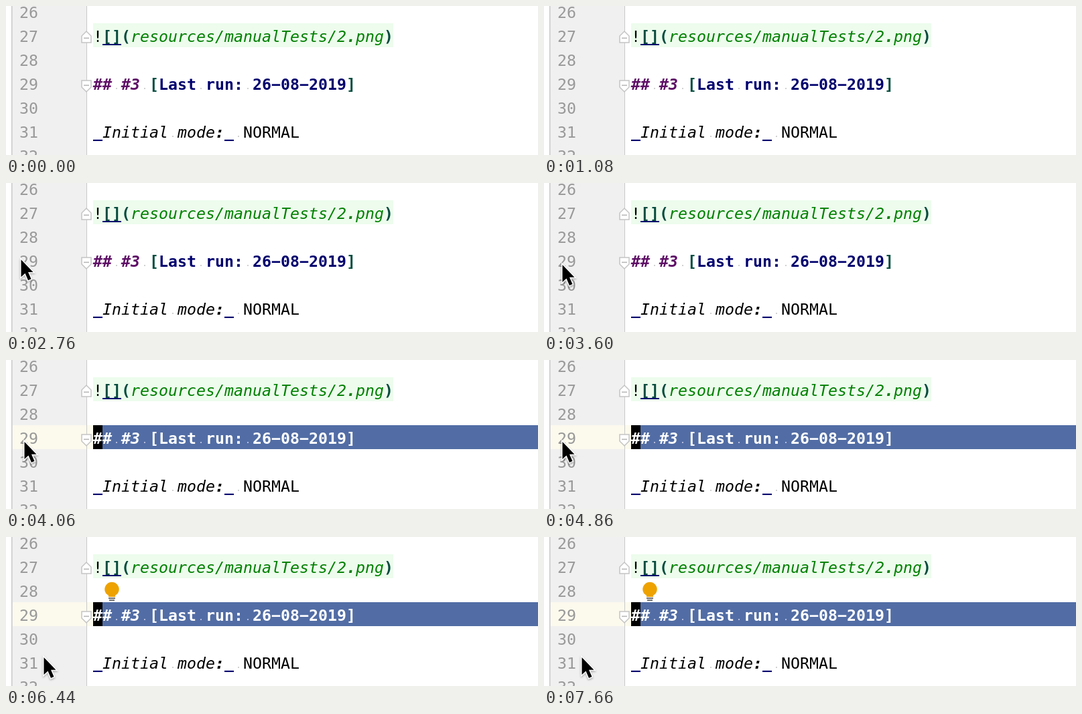
Recreate the animation shown at these times as an HTML page with a canvas. Size 794 px wide and 224 px high, loop 7.7 s.

```html
<!DOCTYPE html>
<html lang="en">
<head>
<meta charset="utf-8">
<title>Selecting a line from the gutter</title>
<style>
  html, body { margin: 0; width: 100%; height: 100%; overflow: hidden; background: #fff; }
  canvas { display: block; width: 794px; height: 224px; }
</style>
</head>
<body>
<canvas id="stage" width="794" height="224"></canvas>
<script>
const ctx = document.getElementById('stage').getContext('2d');
const LOOP = 7700, SELECT_AT = 3880, BULB_AT = 6400, ARROW_AT = 2700;
const CELL = 14, ROW = 36, LEFT = 130;
const FONT = '23.25px "DejaVu Sans Mono", "Liberation Mono", monospace';
const PAPER = '#ffffff', GUTTER = '#f0f0f0', EDGE = '#c9c9c9';
const LINK_ROW = '#edfced', CARET_ROW = '#fcfaed', SELECTION = '#526da5';
const GREEN = '#008000', TEAL = '#064b3e', NAVY = '#00006e', PURPLE = '#5e0e66', INK = '#000000';

// Each run: text, colour, font style
const LINES = {
  27: [['!', INK, ''], ['[]', TEAL, 'bold'], ['(', TEAL, 'bold'],
       ['resources/manualTests/2', GREEN, 'italic'], ['.', GREEN, 'italic bold'],
       ['png', GREEN, 'italic'], [')', TEAL, 'bold']],
  29: [['## #3', PURPLE, 'italic bold'], [' ', NAVY, 'bold'], ['[', TEAL, 'bold'],
       ['Last run: 26\u221208\u22122019', NAVY, 'bold'], [']', TEAL, 'bold']],
  31: [['_', NAVY, 'bold'], ['Initial mode', INK, 'italic'], [':', INK, 'italic bold'],
       ['_', NAVY, 'bold'], [' NORMAL', INK, '']]
};

// Pointer positions: time, x, y
const PATH = [
  [1860, -20, 94], [2060, 12.5, 99.5], [2460, 12.5, 99.5], [2950, 27.5, 123],
  [4880, 27.5, 123], [5420, 56.5, 181], [LOOP, 56.5, 181]
];

const baseline = n => 18 + (n - 26) * ROW;

function rect(x, y, w, h, color) {
  ctx.fillStyle = color;
  ctx.fillRect(x, y, w, h);
}

function shape(points, x = 0, y = 0) {
  ctx.beginPath();
  points.forEach(([px, py]) => ctx.lineTo(x + px, y + py));
  ctx.closePath();
}

function cells(text, x, y, color, style) {
  ctx.font = style + ' ' + FONT;
  [...text].forEach((ch, i) => {
    const cx = x + i * CELL;
    if (ch === ' ') {
      rect(cx + 6, y - 3, 2, 2, color === PAPER ? '#b4bbdc' : '#d0d0d0');
    } else {
      ctx.fillStyle = color;
      ctx.fillText(ch, cx, y);
    }
  });
}

function line(n, selected) {
  let x = LEFT;
  for (const [text, color, style] of LINES[n]) {
    cells(text, x, baseline(n), selected ? PAPER : color, style);
    x += text.length * CELL;
  }
}

function fold(y, dir) {
  shape([[0, -9 * dir], [7, -2 * dir], [7, 8 * dir], [-7, 8 * dir], [-7, -2 * dir]], 120, y);
  ctx.fillStyle = PAPER;
  ctx.fill();
  ctx.strokeStyle = '#c4c4c4';
  ctx.lineWidth = 1.5;
  ctx.stroke();
  rect(116, y + dir - 0.5, 8, 1.6, '#b8b8b8');
}

function bulb() {
  ctx.fillStyle = '#eda200';
  ctx.beginPath();
  ctx.arc(158, 78.5, 10.7, 0, Math.PI * 2);
  ctx.fill();
  rect(153, 86, 10, 4, '#eda200');
  rect(153, 91, 10, 2, '#6e6e6e');
  rect(154, 94, 8, 2, '#6e6e6e');
}

function outlined(points, x, y) {
  ctx.save();
  ctx.shadowColor = 'rgba(0,0,0,.3)';
  ctx.shadowBlur = 3;
  ctx.shadowOffsetY = 1.5;
  shape(points, x, y);
  ctx.lineJoin = 'miter';
  ctx.lineWidth = 3;
  ctx.strokeStyle = PAPER;
  ctx.stroke();
  ctx.restore();
  ctx.fillStyle = INK;
  ctx.fill();
}

const ARROW = [[0, 0], [0, 26], [6, 20.5], [10.5, 31], [15, 29], [10.5, 18.8], [18, 18.8]];
const QUARTER = [[2.2, -14.5], [2.2, -2], [7.5, -2], [7.5, -7], [14.5, 0]];
const mirror = (sx, sy) => QUARTER.map(([x, y]) => [x * sx, y * sy]);
const RESIZE = [...mirror(1, 1), ...mirror(1, -1).reverse(),
                ...mirror(-1, -1), ...mirror(-1, 1).reverse()];

function pointer(t) {
  if (t < PATH[0][0]) return;
  const i = PATH.findIndex(p => p[0] > t);
  const [t0, x0, y0] = PATH[i - 1], [t1, x1, y1] = PATH[i];
  const u = (t - t0) / (t1 - t0), k = u * u * (3 - 2 * u);
  outlined(t < ARROW_AT ? RESIZE : ARROW, x0 + (x1 - x0) * k, y0 + (y1 - y0) * k);
}

function draw(t) {
  const selected = t >= SELECT_AT;
  rect(0, 0, 794, 224, PAPER);
  rect(9, 0, 111, 224, GUTTER);
  rect(8, 0, 1.5, 224, EDGE);
  rect(LEFT, 26, 32 * CELL, ROW, LINK_ROW);
  if (selected) {
    rect(10, 98, 120, ROW, CARET_ROW);
    rect(LEFT, 98, 664, ROW, SELECTION);
    rect(LEFT, 98, CELL, ROW, INK);
  }
  rect(120, 0, 1, 224, EDGE);

  for (let n = 26; n <= 32; n++) cells(String(n), 20, baseline(n), '#999999', '');
  line(27);
  rect(144, 57, 28, 2, NAVY);
  line(29, selected);
  line(31);
  fold(47, 1);
  fold(120, -1);
  if (t >= BULB_AT) bulb();
  pointer(t);
}

const start = performance.now();
function tick() {
  draw((performance.now() - start) % LOOP);
  requestAnimationFrame(tick);
}
tick();
</script>
</body>
</html>
```
